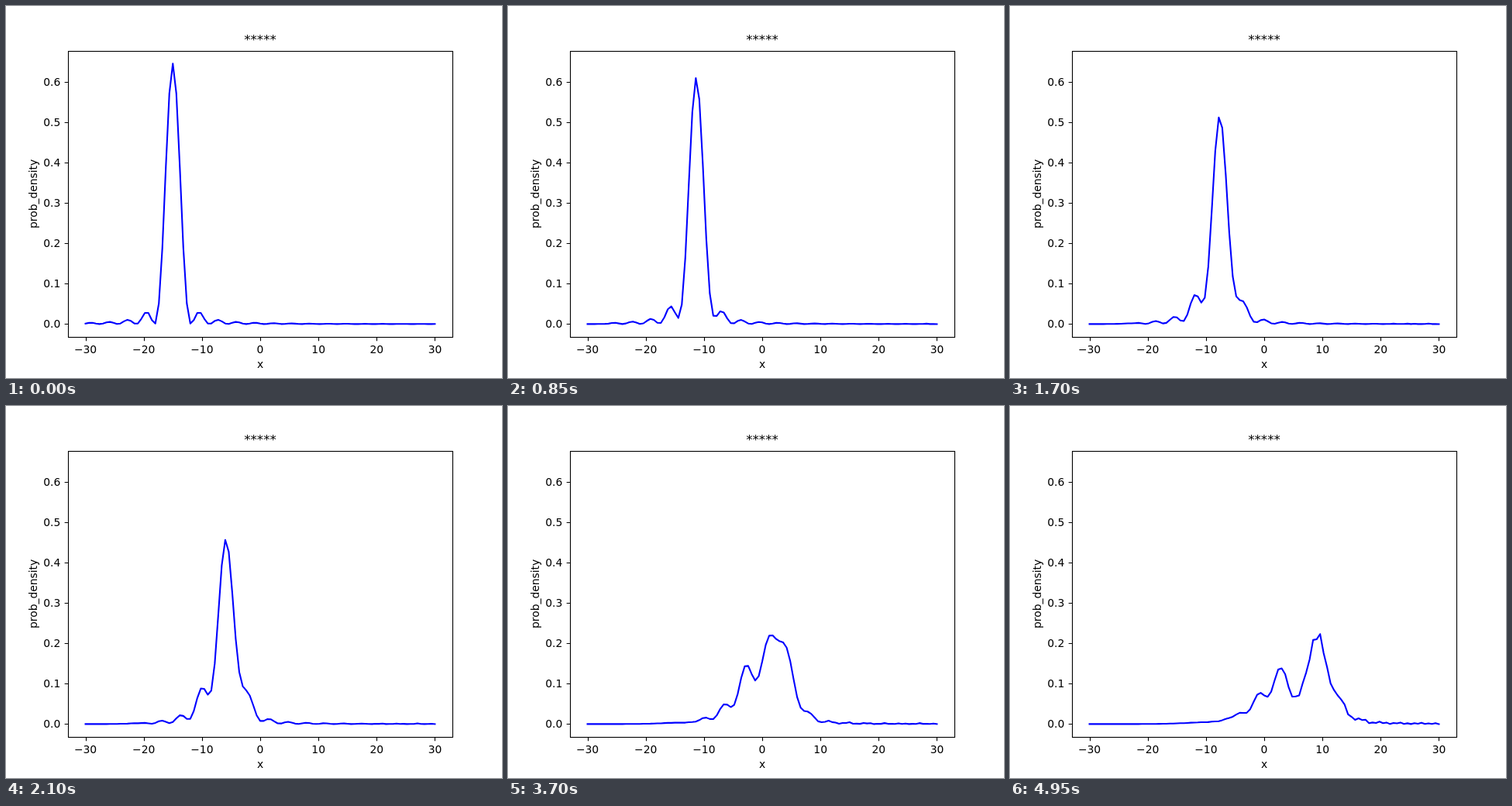
An HTML page that plays this animation: 640x480 px, repeating every 5 s.

```html
<!DOCTYPE html>
<html lang="en">
<head>
<meta charset="utf-8">
<title>Wave packet</title>
<style>
  html, body { margin: 0; width: 100%; height: 100%; overflow: hidden; background: #fff; }
  svg { display: block; width: 640px; height: 480px; }
  text { font: 13.889px "DejaVu Sans", sans-serif; text-anchor: middle; }
  .title { font-size: 16.667px; }
  .yticks text { text-anchor: end; }
  .axes { fill: none; stroke: #000; stroke-width: 1.11; }
  #curve { fill: none; stroke: #00f; stroke-width: 2.083; stroke-linejoin: round; stroke-linecap: square; }
</style>
</head>
<body>
<svg viewBox="0 0 640 480">
  <path id="ticks" class="axes"/>
  <polyline id="curve"/>
  <rect class="axes" x="80.5" y="58.5" width="496" height="369"/>
  <g id="xticks"></g>
  <g id="yticks" class="yticks"></g>
  <text class="title" x="328" y="49">*****</text>
  <text x="328" y="467">x</text>
  <text transform="translate(40 242.4) rotate(-90)" x="0" y="0">prob_density</text>
</svg>
<script>
const SITES = 101, DX = 0.6, FRAMES = 100, FRAME_MS = 50;
const DT = 0.164, SUBSTEPS = 8;               // time per frame
const PEAK = 0.6457, X0 = -15, K0 = 1.6;      // initial packet

const byId = id => document.getElementById(id);
const px = x => 328 + x * 496 / 66;
const py = p => 410.4 - p * 336 / PEAK;
const snap = v => Math.floor(v + 0.5) + 0.5;

function drawTicks() {
  let path = "";
  const label = (group, x, y, str) => {
    const t = document.createElementNS("http://www.w3.org/2000/svg", "text");
    t.setAttribute("x", x);
    t.setAttribute("y", y);
    t.textContent = str;
    byId(group).append(t);
  };
  for (let x = -30; x <= 30; x += 10) {
    path += `M${snap(px(x))} 427.5v4.86`;
    label("xticks", px(x), 448, String(x).replace("-", "\u2212"));
  }
  for (let i = 0; i <= 6; i++) {
    const y = py(i / 10);
    path += `M80.5 ${snap(y)}h-4.86`;
    label("yticks", 70.3, Math.round(y + 5), (i / 10).toFixed(1));
  }
  byId("ticks").setAttribute("d", path);
}

const position = j => -30 + j * DX;

function initialPacket() {
  const re = new Float64Array(SITES), im = new Float64Array(SITES);
  for (let j = 0; j < SITES; j++) {
    const x = position(j), u = x - X0;
    const a = Math.sqrt(PEAK) * (Math.abs(u) < 1e-9 ? 1 : Math.sin(u) / u);
    re[j] = a * Math.cos(K0 * x);
    im[j] = a * Math.sin(K0 * x);
  }
  return { re, im };
}

// Kinetic energy on the grid, with hard walls at both ends
function kinetic(v, scale) {
  const out = new Float64Array(SITES);
  for (let j = 1; j < SITES - 1; j++)
    out[j] = scale * (2 * v[j] - v[j - 1] - v[j + 1]) / (2 * DX * DX);
  return out;
}

// Fourth-order Taylor step of exp(-iHt)
function step(psi, dt) {
  let { re, im } = psi;
  for (let n = 1; n <= 4; n++) {
    [re, im] = [kinetic(im, dt / n), kinetic(re, -dt / n)];
    for (let j = 0; j < SITES; j++) {
      psi.re[j] += re[j];
      psi.im[j] += im[j];
    }
  }
}

const toPoints = ({ re, im }) => Array.from(re, (r, j) =>
  px(position(j)).toFixed(2) + "," + py(r * r + im[j] * im[j]).toFixed(2)).join(" ");

function simulate() {
  const psi = initialPacket(), frames = [toPoints(psi)];
  for (const part of [psi.re, psi.im]) part[0] = part[SITES - 1] = 0;
  while (frames.length < FRAMES) {
    for (let s = 0; s < SUBSTEPS; s++) step(psi, DT / SUBSTEPS);
    frames.push(toPoints(psi));
  }
  return frames;
}

drawTicks();
const frames = simulate();
let shown = -1;

function render() {
  const n = Math.floor(performance.now() / FRAME_MS) % FRAMES;
  if (n !== shown) byId("curve").setAttribute("points", frames[shown = n]);
  requestAnimationFrame(render);
}
render();
</script>
</body>
</html>
```
